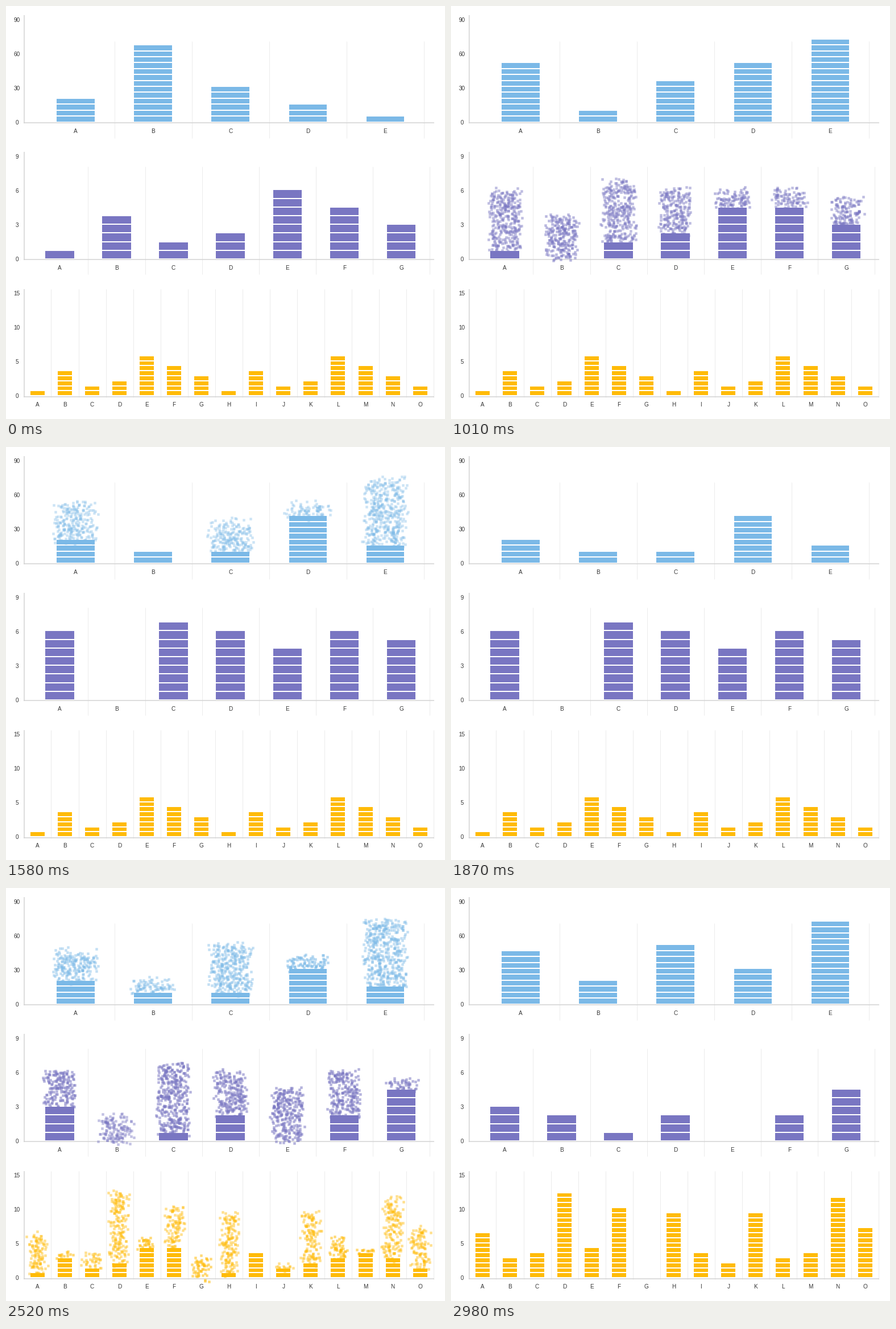
A matplotlib script that plays this animation: 772 px wide and 725 px high, repeating every 3210 ms.

```python
import numpy as np
import matplotlib.pyplot as plt
from matplotlib.animation import FuncAnimation
from matplotlib.collections import PolyCollection

W, H, DPI = 772, 725, 100
STEP, FRAMES = 30, 107      # ms per frame, frames per loop
PT = 72 / DPI               # points per pixel
LEAD, DURATION = 220, 800   # opening pause and length of one change, ms
FIRST, BEAT, LAST = 160, 455, 2170
SPREAD = 14                 # farthest scatter of a particle
DOT = 4.5                   # particle side
DENSITY = 1 / 16            # particles per square pixel of block
GAP = 2                     # white line between blocks

fig = plt.figure(figsize=(W / DPI, H / DPI), dpi=DPI, facecolor="white")
ax = fig.add_axes([0, 0, 1, 1])
ax.set_xlim(0, W)
ax.set_ylim(H, 0)
ax.axis("off")


def line(xs, ys, color, width, z):
    ax.plot(xs, ys, color=color, lw=width * PT, zorder=z,
            solid_capstyle="butt")


def label(x, y, text):
    ax.text(x, y + 3.6, text, ha="center", va="baseline", color="#333333",
            family="Liberation Sans", fontsize=10 * PT, zorder=6)


def dots(color):
    return ax.scatter([], [], s=(DOT * PT) ** 2, marker="s", color=color,
                      linewidths=0, zorder=4, snap=False)


class Chart:
    """A row of stacked bars whose blocks burst into and form from dots."""

    def __init__(self, row, color, left, slot, width, pitch, unit,
                 grid, start, moves):
        self.base = 205 + 240.3 * row
        self.width, self.pitch = width, pitch
        self.start, self.moves = start, moves
        n = len(start)
        self.lefts = left + slot * (np.arange(n) + 0.5) - width / 2
        self.draw_axes(n, left, slot, unit, grid)
        self.bars = PolyCollection([], facecolors=color, linewidths=0,
                                   zorder=3)
        ax.add_collection(self.bars)
        self.groups = dots(color), dots(color)
        rng = np.random.default_rng(row + 1)
        self.clouds = []
        old = start
        for _, new in moves:
            self.clouds.append((self.cloud(rng, old, new),
                                self.cloud(rng, new, old)))
            old = new

    def draw_axes(self, n, left, slot, unit, grid):
        base = self.base
        for i in range(n):
            x = left + slot * (i + 1)
            line([x, x], [base + grid[0], base + grid[1]], "#ebebeb", 1, 1)
            label(x - slot / 2, base + 14.2, chr(65 + i))
        line([32, 32], [base - 189, base + 1], "#d3d3d3", 1.5, 2)
        line([31, 753], [base, base], "#d3d3d3", 1.5, 2)
        for k in range(4):
            label(19, base - 1 - 60 * k, str(unit * k))

    def top(self, level):
        return self.base - 0.4 - self.pitch * level

    def cloud(self, rng, low, high):
        """Home places and scatter vectors for the blocks above low."""
        homes = [np.empty((0, 2))]
        for x, a, b in zip(self.lefts, low, high):
            tall = self.pitch * max(b - a, 0)
            count = round(self.width * tall * DENSITY)
            homes.append((x, self.top(b))
                         + rng.random((count, 2)) * (self.width, tall))
        homes = np.concatenate(homes)
        return homes, rng.uniform(-SPREAD, SPREAD, homes.shape)

    def show_bars(self, counts):
        verts = []
        for x, n in zip(self.lefts, counts):
            x0, x1 = round(x), round(x + self.width)
            for k in range(n):
                y0, y1 = round(self.top(k + 1)), round(self.top(k)) - GAP
                verts.append([(x0, y0), (x1, y0), (x1, y1), (x0, y1)])
        self.bars.set_verts(verts)

    def draw(self, now):
        counts, clouds, t = self.start, None, 0
        for (begin, new), pair in zip(self.moves, self.clouds):
            if now <= begin or now < LEAD:
                break
            t = (now - begin) / DURATION
            if t < 1:
                clouds = pair
                counts = [min(a, b) for a, b in zip(counts, new)]
                break
            counts = new
        self.show_bars(counts)
        for i, group in enumerate(self.groups):
            group.set_visible(clouds is not None)
            if clouds:
                homes, drift = clouds[i]
                far = t if i else 1 - t
                group.set_offsets(homes + drift * far)
                group.set_alpha(1 - far)


WAVE = [1, 5, 2, 3, 8, 6, 4]    # opening bars shared by the lower charts

charts = [
    Chart(0, "#7bb9e7", 54.4, 136.1, 66.5, 10.42, 30, (-143, 27),
          [4, 13, 6, 3, 1],
          [(FIRST, [10, 2, 7, 10, 14]),
           (FIRST + 2 * BEAT, [4, 2, 2, 8, 3]),
           (LAST, [9, 4, 10, 6, 14])]),
    Chart(1, "#7976c2", 44.2, 100.15, 50.5, 15.2, 3, (-163, 26),
          WAVE,
          [(FIRST + BEAT, [8, 0, 9, 8, 6, 8, 7]),
           (LAST, [4, 3, 1, 3, 0, 3, 6])]),
    Chart(2, "#ffbb08", 31.4, 48.05, 25, 8.8, 5, (-189, 1),
          WAVE * 2 + [2],
          [(LAST, [9, 4, 5, 17, 6, 14, 0, 13, 5, 3, 13, 4, 5, 16, 10])]),
]


def update(i):
    for chart in charts:
        chart.draw(i * STEP + 10)
    return []


anim = FuncAnimation(fig, update, frames=FRAMES, interval=STEP, repeat=True,
                     repeat_delay=0, init_func=lambda: update(0))
plt.show()
```
